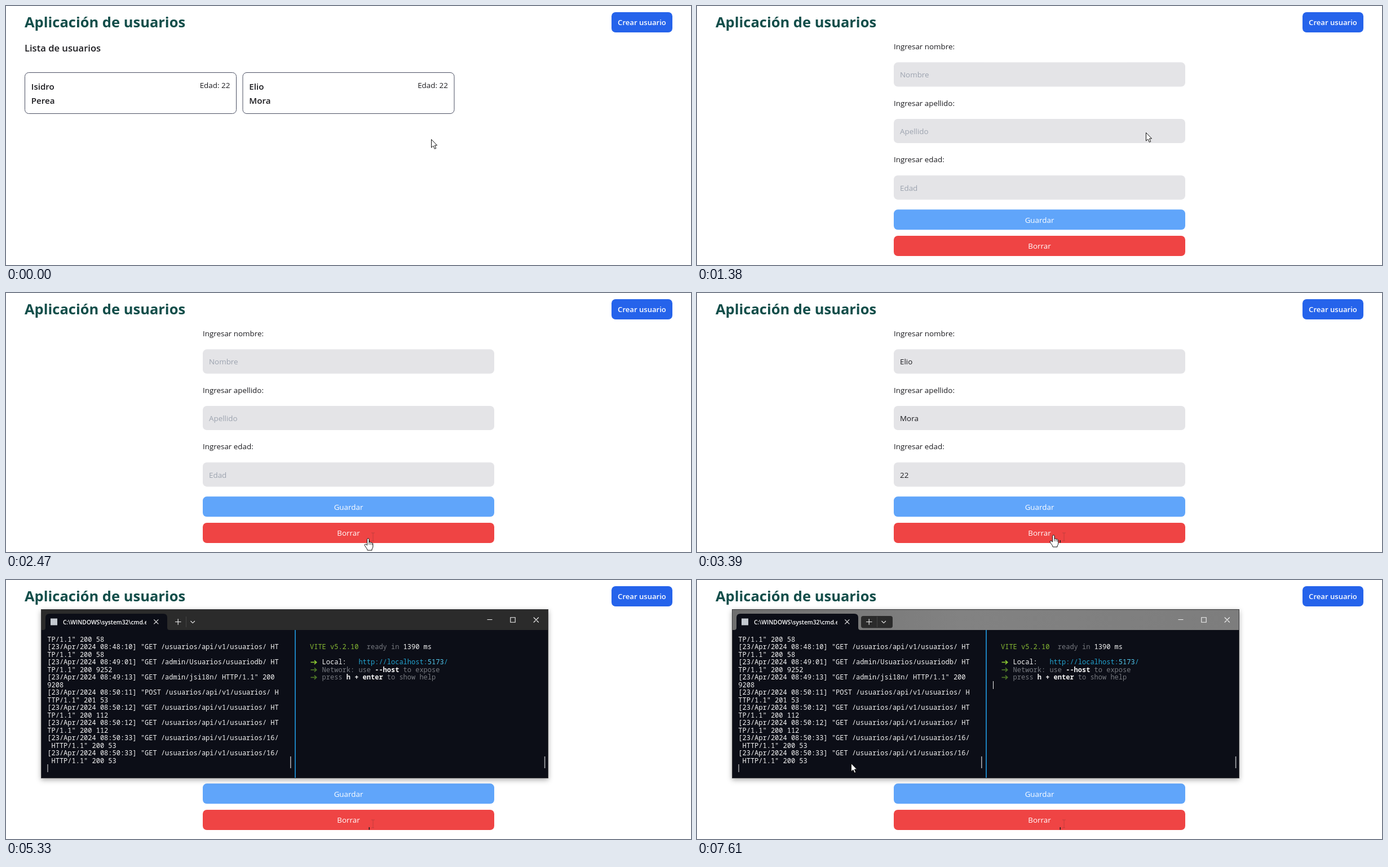
An HTML page that plays this animation: 1215 by 461 pixels, repeating every 8000 ms.

```html
<!DOCTYPE html>
<html lang="es">
<head>
<meta charset="utf-8">
<title>Aplicación de usuarios</title>
<style>
html, body { margin: 0; width: 100%; height: 100%; overflow: hidden; background: #fff; }
svg { display: block; }
text { font-family: "Open Sans", "Noto Sans", sans-serif; font-size: 13.4px; fill: #1b1b1f; white-space: pre; }
.mid { text-anchor: middle; }
.end { text-anchor: end; }
.white { fill: #fff; }
.hint { fill: #9ca3af; }
.name { font-size: 15.1px; font-weight: 600; }
.mono { font-family: "Noto Sans Mono", "DejaVu Sans Mono", monospace; font-size: 12px; font-weight: 500; fill: #f4f4f4; }
.card { fill: #fff; stroke: #4b5063; stroke-width: 1; }
.icon { fill: none; stroke: #f2f2f2; stroke-width: 1.1; }
#win { filter: drop-shadow(0 3px 5px rgba(0, 0, 0, .32)); }
.cursor { fill: #fff; stroke: #111; stroke-width: 1; stroke-linejoin: round; }
</style>
</head>
<body>
<svg id="stage" width="1215" height="461" viewBox="0 0 1215 461"></svg>
<script>
const LOOP = 8000;
const FORM_AT = 890, FILL_AT = 2610, WINDOW_AT = 5330, BLINK = 550;

const text = (x, y, s, cls = '', extra = '') =>
  `<text x="${x}" y="${y}" class="${cls}" ${extra}>${s}</text>`;
const box = (x, y, w, h, r, fill, extra = '') =>
  `<rect x="${x}" y="${y}" width="${w}" height="${h}" rx="${r}" fill="${fill}" ${extra}/>`;
const icon = d => `<path class="icon" d="${d}"/>`;

const header =
  text(33, 38, 'Aplicación de usuarios', '', 'style="font-size:25.5px;font-weight:700;fill:#134e4a"') +
  box(1074, 11, 108, 36, 7.2, '#2563eb') +
  text(1128, 34, 'Crear usuario', 'mid white', 'style="font-size:13.1px;font-weight:600"');

const card = (x, id, first, last) =>
  `<rect id="${id}" class="card" x="${x}" y="118.5" width="375" height="73" rx="7"/>` +
  text(x + 11.3, 149, first, 'name') + text(x + 11.3, 174, last, 'name') +
  text(x + 363.8, 146, 'Edad: 22', 'end');

const list =
  text(33, 80.5, 'Lista de usuarios', '', 'style="font-size:16.6px;font-weight:600"') +
  card(33.5, 'card1', 'Isidro', 'Perea') + card(420, 'card2', 'Elio', 'Mora');

const fields = [['nombre', 'Nombre', 'Elio'], ['apellido', 'Apellido', 'Mora'], ['edad', 'Edad', '22']];
const form = fields.map(([label, hint, value], i) => {
  const y = i * 100.6;
  return text(349, 77 + y, `Ingresar ${label}:`) +
    box(349, 100.3 + y, 517, 43.2, 7.2, '#e4e4e7') +
    text(360, 127.3 + y, hint, 'hint') + text(360, 127.3 + y, value, 'value');
}).join('') +
  box(349, 362.3, 517, 36, 7.2, '#60a5fa') + text(607.5, 385.5, 'Guardar', 'mid white') +
  box(349, 409, 517, 36, 7.2, '#ef4444') + text(607.5, 432.3, 'Borrar', 'mid white') +
  `<g id="trail"><path d="M648 427h6M651 427v14M648 441h5" stroke="#a83a3a" fill="none" stroke-width=".8" opacity=".75"/>
   <path d="M644.3 440v4.5" stroke="#222" stroke-width="1.6"/></g>`;

// Terminal window
const row = i => 110 + i * 13.47;
const log = (time, req, rest) => [`[23/Apr/2024 ${time}] "${req}`, rest];
const api = 'GET /usuarios/api/v1/usuarios/';
const lines = [
  'TP/1.1" 200 58',
  ...log('08:48:10', api + ' HT', 'TP/1.1" 200 58'),
  ...log('08:49:01', 'GET /admin/Usuarios/usuariodb/ HT', 'TP/1.1" 200 9252'),
  ...log('08:49:13', 'GET /admin/jsi18n/ HTTP/1.1" 200', '9208'),
  ...log('08:50:11', 'POST /usuarios/api/v1/usuarios/ H', 'TTP/1.1" 201 53'),
  ...log('08:50:12', api + ' HT', 'TP/1.1" 200 112'),
  ...log('08:50:12', api + ' HT', 'TP/1.1" 200 112'),
  ...log('08:50:33', api + '16/', ' HTTP/1.1" 200 53'),
  ...log('08:50:33', api + '16/', ' HTTP/1.1" 200 53')
];
const span = (s, fill, bold) =>
  `<tspan style="fill:${fill}${bold ? ';font-weight:600' : ''}">${s}</tspan>`;
const gray = '#777a80', white = '#f5f5f5';
const rich = (x, i, ...parts) => text(x, row(i), parts.map(p => span(...p)).join(''), 'mono');
const arrow = (i, color) =>
  `<path d="M540.5 ${row(i) - 4}h10m-3.6 -3.4l3.8 3.4l-3.8 3.4" fill="none" stroke="${color}" stroke-width="1.7"/>`;

const win = `<g id="win">${box(62, 52, 900, 301, 0, '#0c0e17')}</g>` +
  box(62, 52, 900, 37, 0, '#2b2b2b') +
  `<g id="lit">${box(62, 52, 900, 37, 0, 'url(#bar)')}${box(291, 64, 56, 21.5, 4, '#2b2b2b')}</g>` +
  box(62.5, 52.5, 899, 300, 0, 'none', 'stroke="#3c3c3e"') +
  '<path d="M66 89q4 0 4-4V67q0-7 7-7h202q7 0 7 7v18q0 4 4 4z" fill="#0c0e17"/>' +
  box(79, 68.5, 12, 12, 0, '#c4c9d0') +
  `<g clip-path="url(#tab)">${text(101, 78.6, 'C:\\WINDOWS\\system32\\cmd.exe', 'white',
    'style="font-size:10.3px;font-weight:600"')}</g>` +
  icon('M262.3 70.3l8 8m0-8l-8 8M300 74.5h10.5M305.2 69.3v10.5M327.5 73l3.7 3.6l3.7-3.6') +
  '<path d="M319.5 65v19" stroke="#454545"/>' +
  icon('M853.5 70.5h9M894.8 66.8h8.4v8.4h-8.4zM935.8 66.5l9 9m0-9l-9 9') +
  box(512, 89, 2, 263, 0, '#1c7fbd') +
  box(504, 314, 1.6, 21, 0, '#a9abb0') + box(954.8, 314, 1.6, 21, 0, '#a9abb0') +
  lines.map((s, i) => text(73.3, row(i), s, 'mono')).join('') +
  box(73.5, 328, 1, 14, 0, '#eee') +
  rich(539, 1, ['VITE v5.2.10', '#86b833'], ['  ready in ', gray], ['1390 ms', white]) +
  arrow(3, '#86c232') + arrow(4, '#4c7427') + arrow(5, '#4c7427') +
  rich(560.6, 3, ['Local:   ', white], ['http://localhost:', '#22a3cf'], ['5173', '#55c8ee'], ['/', '#22a3cf']) +
  rich(560.6, 4, ['Network: use ', gray], ['--host', white, 1], [' to expose', gray]) +
  rich(560.6, 5, ['press ', gray], ['h + enter', white, 1], [' to show help', gray]) +
  box(525, 180, 1, 14, 0, '#eee', 'id="caret"');

const cursors =
  '<path id="arrow" class="cursor" d="M.5 .5V15L3.9 11.9L6.3 17.3L8.7 16.3L6.4 11H10.6Z"/>' +
  `<g id="hand" class="cursor"><path d="M-2.4 12V1.6a1.7 1.7 0 0 1 3.4 0V7.2a1.6 1.6 0 0 1 3 .3
    a1.5 1.5 0 0 1 2.6.7a1.3 1.3 0 0 1 1.3 1.4V14q0 3-1.9 5V21H-1.8q-.4-2.6-3-5.6l-1.9-3
    q-.7-2 1-2.3q1.6 0 3.3 1.9z"/><path d="M1 7.2V11M4 8V11.3M6.6 9V11.6" stroke-width=".8"/></g>` +
  '<path id="beam" d="M-3 -7.5h6M0 -7.5v15M-3 7.5h6" fill="none" stroke="#222"/>';

const stage = document.getElementById('stage');
stage.innerHTML =
  `<defs><linearGradient id="bar"><stop stop-color="#6f6f6f"/><stop offset=".45" stop-color="#828282"/>
   <stop offset="1" stop-color="#7d7d7d"/></linearGradient>
   <clipPath id="tab"><rect x="101" y="62" width="148" height="26"/></clipPath></defs>` +
  header + `<g id="list">${list}</g><g id="form">${form}</g><g id="term">${win}</g>` + cursors;

const $ = id => document.getElementById(id);
const show = (el, on) => { el.style.display = on ? '' : 'none'; };

// time, x, y, cursor used until the next key
const keys = [
  [0, 754, 237, 'arrow'], [70, 750, 235, 'arrow'], [230, 655, 191, 'hand'],
  [400, 470, 119, 'arrow'], [470, 399, 108, 'arrow'], [560, 424, 119, 'hand'],
  [750, 577, 164, 'hand'], [890, 580, 166, 'arrow'], [1240, 775, 215, 'arrow'],
  [1450, 806, 230, 'arrow'], [1520, 770, 232, 'beam'], [1650, 645, 233, 'beam'],
  [1720, 600, 245, 'arrow'], [1840, 540, 301, 'beam'], [1940, 560, 345, 'arrow'],
  [1990, 585, 362, 'hand'], [2190, 651, 433, 'beam'], [2330, 650, 434, 'hand'],
  [2470, 643, 437, 'hand'], [2610, 643, 437, 'hand'], [2720, 637, 435, 'hand'],
  [3050, 637, 435, 'hand'], [3190, 633, 431, 'hand'], [3390, 633, 431, 'hand'],
  [3460, 631, 431, 'hand'], [4190, 631, 431, 'hand'], [4290, 612, 420, 'hand'],
  [4370, 598, 445, 'arrow'], [4440, 587, 461, ''],
  [5540, 560, 330, 'arrow'], [5800, 420, 285, 'arrow'], [6110, 320, 270, 'arrow'],
  [6300, 246, 300, 'arrow'], [6430, 236, 329, 'arrow'], [6600, 273, 326, 'arrow'],
  [LOOP, 273, 326, 'arrow']
];

function pointer(t) {
  const i = keys.findIndex(k => k[0] > t) - 1;
  const [t0, x0, y0, kind] = keys[i], [t1, x1, y1] = keys[i + 1];
  const p = (t - t0) / (t1 - t0);
  return { x: x0 + (x1 - x0) * p, y: y0 + (y1 - y0) * p, kind };
}

const hints = document.querySelectorAll('.hint'), values = document.querySelectorAll('.value');

function draw(t) {
  const { x, y, kind } = pointer(t);
  for (const id of ['arrow', 'hand', 'beam']) {
    show($(id), id === kind);
    $(id).setAttribute('transform', `translate(${Math.round(x)} ${Math.round(y)})`);
  }
  show($('list'), t < FORM_AT);
  show($('form'), t >= FORM_AT);
  show($('term'), t >= WINDOW_AT);
  $('card2').style.fill = kind === 'hand' && x > 420 && y > 118 ? '#d4d4d8' : '';
  hints.forEach(el => show(el, t < FILL_AT));
  values.forEach(el => show(el, t >= FILL_AT));
  show($('trail'), t >= 2330);
  $('lit').style.opacity = Math.min(1, Math.max(0, (t - 5400) / 300));
  show($('caret'), t >= 5410 && Math.floor((t - 5410) / BLINK) % 2 === 0);
}

const start = performance.now();
function tick() {
  draw((performance.now() - start) % LOOP);
  requestAnimationFrame(tick);
}
tick();
</script>
</body>
</html>
```
